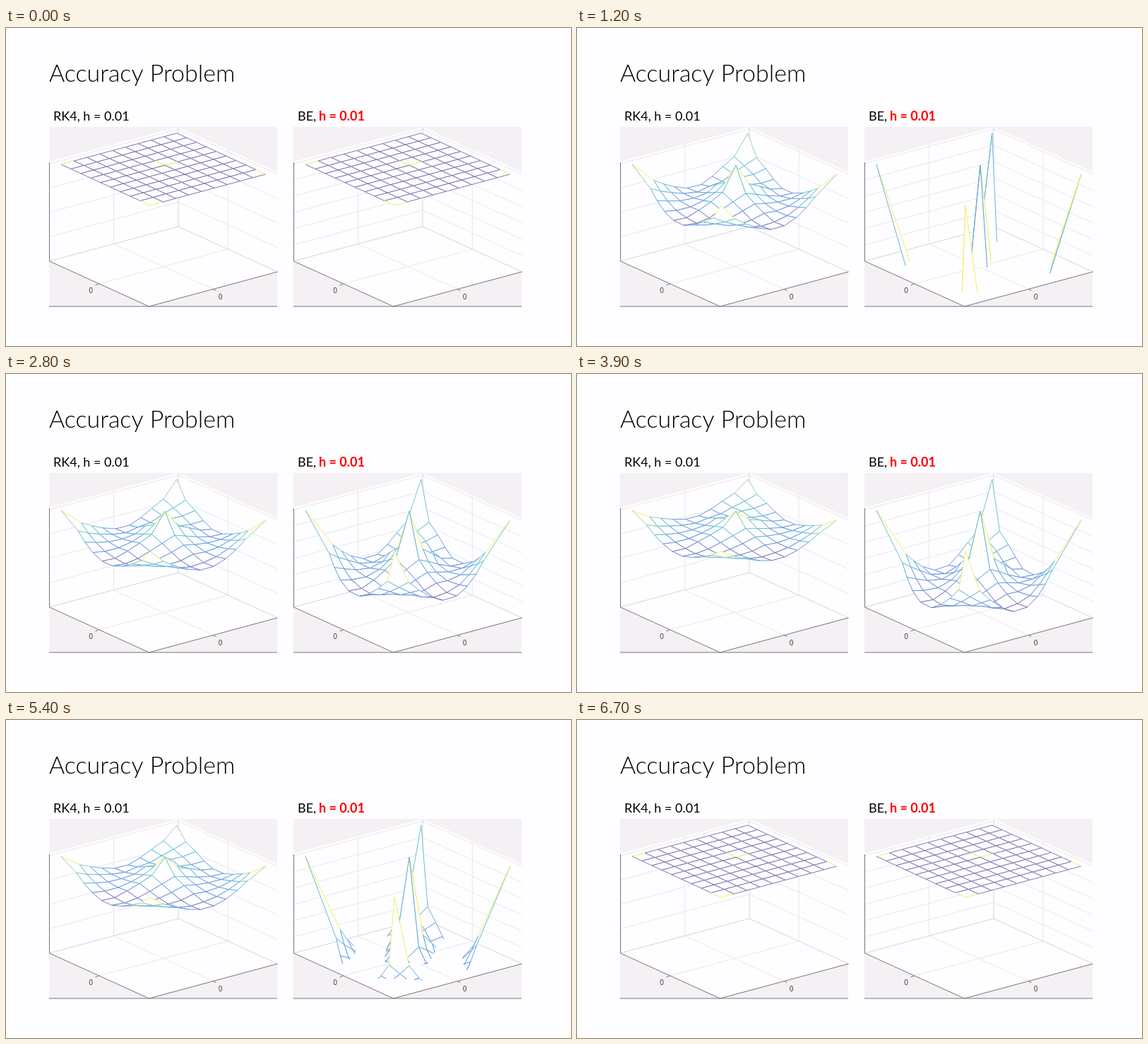
Animation, 800 px wide and 450 px high, one loop 6.8 s. Source, as an HTML page with a canvas:

```html
<!DOCTYPE html>
<html lang="en">
<head>
<meta charset="utf-8">
<title>Accuracy Problem</title>
<style>
html, body { margin: 0; width: 100%; height: 100%; overflow: hidden; background: #fefdff; }
canvas { display: block; }
</style>
</head>
<body>
<canvas id="stage" width="800" height="450"></canvas>
<script>
const ctx = document.getElementById('stage').getContext('2d');
const LOOP = 6800, FLAT_FROM = 6700, STEP = 100;
const N = 10, PAPER = '#fefdff', FLOOR = -9.86;
const at = (i, j) => i * N + j;
const pins = new Set([at(0, 0), at(9, 0), at(0, 9), at(9, 9), at(5, 4)]);
const flatY = 246;
const lerp = (a, b, k) => a + (b - a) * k;
const mix = (a, b, k) => a.map((v, n) => lerp(v, b[n], k));

// Cloth coordinates (cells) to panel pixels
const project = ([u, v, z]) => [78 + 18.2 * u + 14 * v, 193 - 4.9 * u + 6.44 * v - 14 * z];
const nearness = ([u, v, z]) => 0.866 * (0.793 * v - 0.609 * u) + 0.5 * z;

// Hanging shapes of a firm spring net on soft pin strings, under growing load
function hangingShapes(levels, maxLoad) {
  const springs = [], pos = [], vel = [];
  const join = (a, b, rest, shear) => {
    const pinned = pins.has(a) || pins.has(b);
    if (!(pinned && shear)) springs.push({ a, b, rest, k: pinned ? 0.15 : shear ? 0.25 : 1 });
  };
  for (let i = 0; i < N; i++) for (let j = 0; j < N; j++) {
    pos.push([i, j, pins.has(at(i, j)) ? 0 : -0.001]);
    vel.push([0, 0, 0]);
    if (i < N - 1) join(at(i, j), at(i + 1, j), 1, false);
    if (j < N - 1) join(at(i, j), at(i, j + 1), 1, false);
    if (i < N - 1 && j < N - 1) {
      join(at(i, j), at(i + 1, j + 1), Math.SQRT2, true);
      join(at(i + 1, j), at(i, j + 1), Math.SQRT2, true);
    }
  }
  const snapshot = () => ({
    y: Math.max(...pos.filter((p, n) => !pins.has(n)).map(p => project(p)[1])),
    pos: pos.map(p => [...p])
  });
  const shapes = [snapshot()];
  for (let n = 1; n <= levels; n++) {
    const load = maxLoad * (n / levels) ** 3;
    for (let pass = 0; pass < 400; pass++) {
      const force = pos.map(() => [0, 0, -load]);
      for (const { a, b, rest, k } of springs) {
        const p = pos[a], q = pos[b], f = force[a], g = force[b];
        const dx = q[0] - p[0], dy = q[1] - p[1], dz = q[2] - p[2];
        const pull = k * (1 - rest / (Math.sqrt(dx * dx + dy * dy + dz * dz) || 1e-6));
        f[0] += pull * dx; f[1] += pull * dy; f[2] += pull * dz;
        g[0] -= pull * dx; g[1] -= pull * dy; g[2] -= pull * dz;
      }
      for (let p = 0; p < N * N; p++) if (!pins.has(p)) for (let k = 0; k < 3; k++) {
        vel[p][k] = (vel[p][k] + 0.22 * force[p][k]) * 0.93;
        pos[p][k] += vel[p][k];
      }
    }
    shapes.push(snapshot());
  }
  return shapes;
}
const shapes = hangingShapes(32, 0.35);

function shapeAt(y) {
  let k = shapes.findIndex(s => s.y > y);
  if (k < 0) k = shapes.length - 1;
  if (k < 1) return shapes[0].pos;
  const a = shapes[k - 1], b = shapes[k];
  const f = Math.min(1, Math.max(0, (y - a.y) / (b.y - a.y)));
  return a.pos.map((p, n) => mix(p, b.pos[n], f));
}

// Turning points of each swing: time, height of the lowest knot on screen
const panels = [
  { x: 0, rows: 4, label: 'RK4, h = 0.01', bold: '',
    keys: [[0, flatY], [1000, 288], [1950, 261], [2900, 278], [3850, 264], [4800, 272.5], [5800, 266], [6800, 270]] },
  { x: 346, rows: 6, label: 'BE, ', bold: 'h = 0.01',
    keys: [[0, flatY], [1450, 473], [3150, 303], [5000, 397], [6850, 306]] }
];

function swing(keys, t) {
  if (t >= FLAT_FROM) return flatY;
  const k = keys.findIndex(key => key[0] > t);
  const [t0, y0] = keys[k - 1], [t1, y1] = keys[k];
  return lerp(y0, y1, (1 - Math.cos(Math.PI * (t - t0) / (t1 - t0))) / 2);
}

const ramp = [[53, 42, 135], [15, 92, 221], [18, 125, 216], [7, 156, 207], [21, 177, 180],
  [89, 189, 140], [165, 190, 107], [225, 185, 82], [252, 206, 46], [249, 251, 14]];
function heat(k) {
  const f = k * (ramp.length - 1), n = Math.min(ramp.length - 2, Math.floor(f));
  const c = mix(mix(ramp[n], ramp[n + 1], f - n), [228, 228, 230], 0.42);
  return `rgb(${c.map(Math.round)})`;
}

function path(points) {
  ctx.beginPath();
  points.forEach(p => ctx.lineTo(...p));
}
function fill(color, ...points) {
  path(points);
  ctx.fillStyle = color;
  ctx.fill();
}
function line(color, ...points) {
  path(points);
  ctx.strokeStyle = color;
  ctx.stroke();
}
function text(str, x, y, font, color = '#000', align = 'left') {
  ctx.font = font;
  ctx.fillStyle = color;
  ctx.textAlign = align;
  ctx.fillText(str, x, y);
}

// Parts of a polygon or segment that lie above the floor
function aboveFloor(points) {
  const out = [];
  points.forEach((p, n) => {
    const q = points[(n + 1) % points.length];
    if (p[2] >= FLOOR) out.push(p);
    if ((p[2] >= FLOOR) !== (q[2] >= FLOOR)) out.push(mix(p, q, (FLOOR - p[2]) / (q[2] - p[2])));
  });
  return out.map(project);
}

function drawBox(rows) {
  const left = [61, 330], back = [244, 281], right = [384.5, 345], front = [202.5, 394];
  const up = ([x, y], h = 141) => [x, y - h];
  const mid = (a, b) => mix(a, b, 0.5);
  const grid = '#e9e7eb', edge = '#d6d4d9', axis = '#77757a';
  ctx.fillStyle = '#f5f0f4';
  ctx.fillRect(61, 140, 323, 254);
  fill(PAPER, up(left), up(back), up(right), right, front, left);
  for (let r = 1; r <= rows; r++) {
    const h = 138 * r / rows;
    line(grid, up(left, h), up(back, h), up(right, h));
  }
  line(grid, up(mid(left, back)), mid(left, back), mid(front, right));
  line(grid, up(mid(back, right)), mid(back, right), mid(left, front));
  line(edge, left, back, right);
  line(edge, up(back), back);
  line(axis, [61.5, 190], [61.5, 330], front, right);
  line(axis, [61, 394], [384, 394]);
  line(axis, [131.5, 362], [126.5, 364]);
  line(axis, [293, 369.5], [297.5, 371.5]);
  const small = '10px "Open Sans", "Noto Sans", sans-serif';
  text('0', 120, 375, small, '#333', 'center');
  text('0', 303.5, 384, small, '#333', 'center');
}

function drawCloth(pos) {
  const heights = pos.map(p => p[2]);
  const low = Math.min(...heights), span = Math.max(...heights) - low || 1;
  const quads = [];
  for (let i = 0; i < N - 1; i++) for (let j = 0; j < N - 1; j++) {
    const q = [pos[at(i, j)], pos[at(i + 1, j)], pos[at(i + 1, j + 1)], pos[at(i, j + 1)]];
    quads.push({ q, near: q.reduce((sum, p) => sum + nearness(p), 0) });
  }
  quads.sort((a, b) => a.near - b.near);
  for (const { q } of quads) {
    const face = aboveFloor(q);
    if (face.length < 3) continue;
    fill(PAPER, ...face);
    const [a, b, c, d] = q;
    for (const [from, to, tint] of [[a, b, a], [d, c, d], [a, d, d], [b, c, c]]) {
      const seg = aboveFloor([from, to]);
      if (seg.length > 1) line(heat((tint[2] - low) / span), ...seg);
    }
  }
}

function draw(t) {
  ctx.fillStyle = PAPER;
  ctx.fillRect(0, 0, 800, 450);
  text('Accuracy Problem', 61, 76, '300 34px Lato, "Open Sans", sans-serif');
  for (const p of panels) {
    ctx.save();
    ctx.translate(p.x, 0);
    ctx.lineWidth = 1;
    ctx.lineJoin = 'round';
    text(p.label, 67, 131, '18px Lato, sans-serif');
    text(p.bold, 97, 131, 'bold 18px Lato, sans-serif', '#f00');
    drawBox(p.rows);
    drawCloth(shapeAt(swing(p.keys, t)));
    ctx.restore();
  }
}

const start = performance.now();
function tick() {
  const t = (performance.now() - start) % LOOP;
  draw(Math.floor(t / STEP) * STEP);
  requestAnimationFrame(tick);
}
tick();
</script>
</body>
</html>
```
